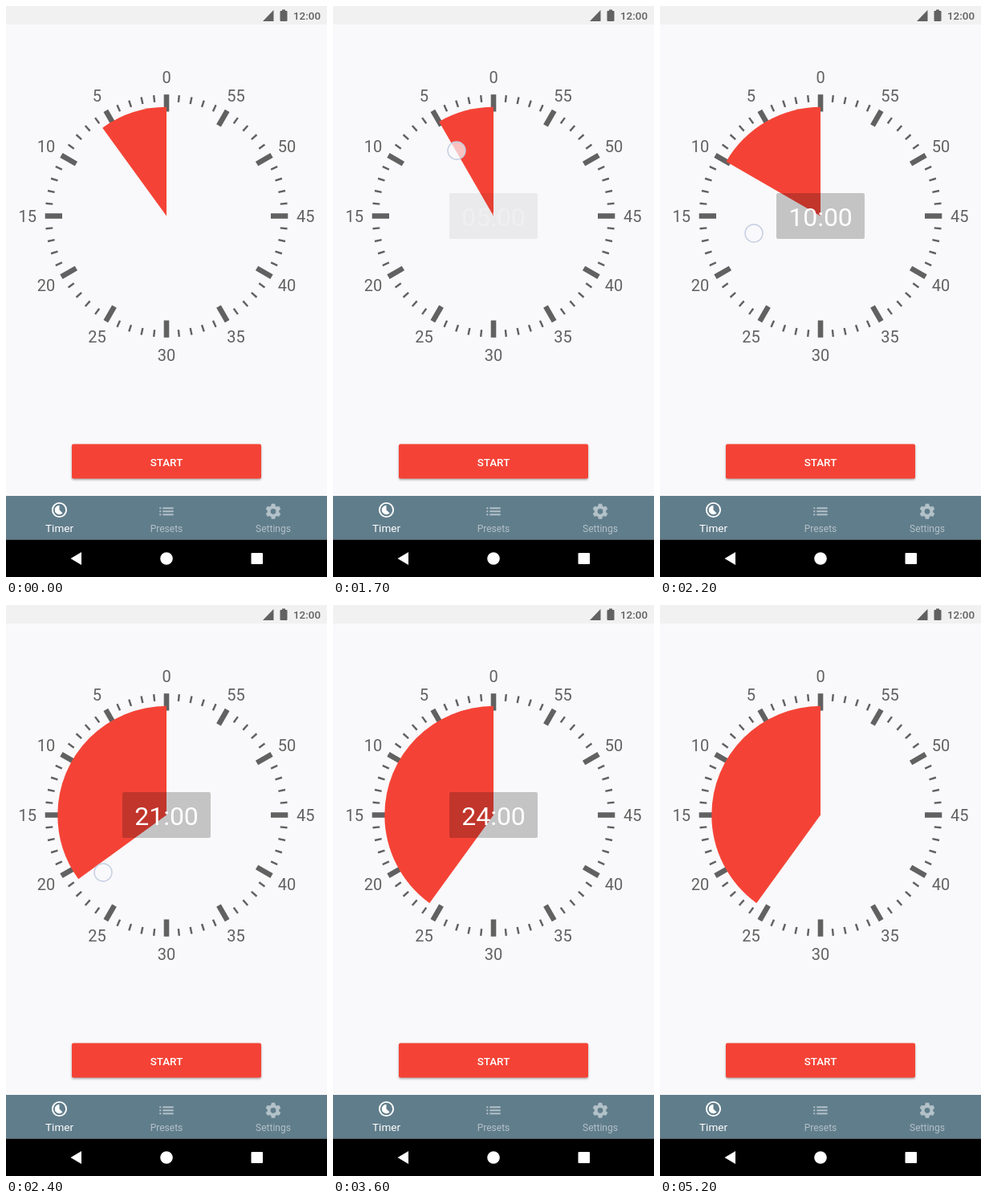
Write an HTML page with a canvas that moves like this. It is 400 px wide and 711 px high and loops after 8 s.

```html
<!DOCTYPE html>
<html lang="en">
<head>
<meta charset="utf-8">
<title>Timer</title>
<style>
html, body { margin: 0; width: 100%; height: 100%; overflow: hidden; background: #f9f8fa; }
canvas { display: block; width: 400px; height: 711px; }
</style>
</head>
<body>
<canvas id="stage"></canvas>
<script>
const W = 400, H = 711, LOOP = 8000, STEP = 100, TAU = Math.PI * 2;
const CX = 200, CY = 261.5;
const RED = '#f44336', GREY = '#616161', DIM = '#b3c1c8';
const canvas = document.getElementById('stage');
const ctx = canvas.getContext('2d');
const dpr = window.devicePixelRatio || 1;
canvas.width = W * dpr;
canvas.height = H * dpr;

// Touch positions, one per step from DRAG_START
const DRAG_START = 1800;
const drag = [
  [154, 180], [151, 186], [142, 204], [127, 242], [117, 283], [116, 313],
  [121, 333], [128, 341], [134, 345.5], [138, 347.5], [140.5, 348.7], [141.5, 349]
];
// [from ms, minutes]
const dial = [
  [0, 6], [1700, 5], [2000, 6], [2100, 7], [2200, 10], [2300, 17],
  [2400, 21], [2500, 22], [2600, 23], [2800, 24]
];

const clamp = (v, lo = 0, hi = 1) => Math.min(hi, Math.max(lo, v));
const ramp = (t, from, to) => clamp((t - from) / (to - from));

function rect(x, y, w, h, color, radius = 0) {
  ctx.fillStyle = color;
  ctx.beginPath();
  ctx.roundRect(x, y, w, h, radius);
  ctx.fill();
}

function disc(x, y, r, color) {
  ctx.fillStyle = color;
  ctx.beginPath();
  ctx.arc(x, y, r, 0, TAU);
  ctx.fill();
}

function polygon(color, ...points) {
  ctx.fillStyle = color;
  ctx.beginPath();
  points.forEach(([x, y]) => ctx.lineTo(x, y));
  ctx.fill();
}

function text(str, x, baseline, size, color, weight = 400) {
  ctx.font = `${weight} ${size}px Roboto, sans-serif`;
  ctx.textAlign = 'center';
  ctx.fillStyle = color;
  ctx.fillText(str, x, baseline);
}

function statusBar() {
  rect(0, 0, W, 23, '#f2f1f2');
  polygon(GREY, [320, 19], [333.5, 19], [333.5, 5]);
  rect(341.5, 6, 9, 13, GREY, 1);
  rect(344, 4.5, 4, 2, GREY);
  text('12:00', 375, 17, 13.4, GREY, 500);
}

function clockFace() {
  for (let m = 0; m < 60; m++) {
    const major = m % 5 === 0;
    const a = m / 60 * TAU;
    const sin = -Math.sin(a), cos = -Math.cos(a);
    const inner = major ? 130 : 142.5;
    ctx.strokeStyle = GREY;
    ctx.lineWidth = major ? 6.6 : 2.4;
    ctx.beginPath();
    ctx.moveTo(CX + sin * inner, CY + cos * inner);
    ctx.lineTo(CX + sin * 151.3, CY + cos * 151.3);
    ctx.stroke();
    if (major) text(m, CX + sin * 173.2, CY + cos * 173.2 + 7.3, 20, GREY);
  }
}

function wedge(minutes) {
  ctx.fillStyle = RED;
  ctx.beginPath();
  ctx.moveTo(CX, CY);
  ctx.arc(CX, CY, 135.7, -TAU / 4, -TAU / 4 - minutes / 60 * TAU, true);
  ctx.fill();
}

function readout(minutes, alpha) {
  if (!alpha) return;
  ctx.globalAlpha = alpha;
  rect(145, 233, 110, 57, 'rgba(0,0,0,.21)', 2);
  text(String(minutes).padStart(2, '0') + ':00', 200, 274, 32, '#fff');
  ctx.globalAlpha = 1;
}

function touch(t) {
  const fadeOut = ramp(t, 3200, 3600);
  const alpha = ramp(t, 1200, 1500) * (1 - fadeOut);
  if (!alpha) return;
  const [x, y] = drag[clamp((t - DRAG_START) / STEP, 0, drag.length - 1)];
  ctx.globalAlpha = alpha;
  disc(x, y, 11 + fadeOut * 2, 'rgba(250,249,252,.7)');
  ctx.strokeStyle = '#c5cee0';
  ctx.lineWidth = 1.4;
  ctx.stroke();
  ctx.globalAlpha = 1;
}

function startButton() {
  ctx.save();
  ctx.shadowColor = 'rgba(0,0,0,.32)';
  ctx.shadowBlur = 3 * dpr;
  ctx.shadowOffsetY = 1.5 * dpr;
  rect(82, 545.5, 236, 43, RED, 2);
  ctx.restore();
  text('START', 200, 572.5, 13.4, '#fff', 500);
}

function timerIcon(x, y) {
  ctx.strokeStyle = '#fff';
  ctx.lineWidth = 1.9;
  ctx.beginPath();
  ctx.arc(x, y, 8.6, 0, TAU);
  ctx.stroke();
  ctx.fillStyle = '#fff';
  ctx.beginPath();
  ctx.moveTo(x, y);
  ctx.arc(x, y, 5.8, -TAU / 4, TAU / 8, true);
  ctx.fill();
}

function listIcon(x, y) {
  for (const dy of [-4, 0, 4]) {
    rect(x - 8.7, y + dy - 1, 2, 2, DIM);
    rect(x - 4.7, y + dy - 1, 13.4, 2, DIM);
  }
}

function gearIcon(x, y) {
  ctx.save();
  ctx.translate(x, y);
  ctx.fillStyle = DIM;
  ctx.beginPath();
  ctx.arc(0, 0, 7.2, 0, TAU);
  ctx.moveTo(3.4, 0);
  ctx.arc(0, 0, 3.4, 0, TAU, true);
  ctx.fill();
  for (let i = 0; i < 6; i++) {
    polygon(DIM, [-3, -6], [-2.1, -9.5], [2.1, -9.5], [3, -6]);
    ctx.rotate(TAU / 6);
  }
  ctx.restore();
}

function bottomBars() {
  rect(0, 610, W, 54.5, '#607d8b');
  timerIcon(66.5, 627.5);
  listIcon(200, 629.3);
  gearIcon(333, 629.3);
  text('Timer', 66.5, 654.5, 13.5, '#fff');
  text('Presets', 200, 654.5, 12, DIM);
  text('Settings', 333, 654.5, 12, DIM);

  rect(0, 664.5, W, H - 664.5, '#000');
  polygon('#fff', [80.5, 688], [94, 680], [94, 696]);
  disc(200, 688, 7.8, '#fff');
  rect(305.5, 681, 14.5, 14, '#fff', 1);
}

function draw(t) {
  const minutes = dial.findLast(([from]) => t >= from)[1];
  ctx.setTransform(dpr, 0, 0, dpr, 0, 0);
  rect(0, 0, W, H, '#f9f8fa');
  statusBar();
  clockFace();
  wedge(minutes);
  readout(minutes, ramp(t, 1600, 1950) * (1 - ramp(t, 4900, 5200)));
  touch(t);
  startButton();
  bottomBars();
}

const started = performance.now();
function frame() {
  const t = (performance.now() - started) % LOOP;
  draw(Math.floor(t / STEP) * STEP);
  requestAnimationFrame(frame);
}
frame();
</script>
</body>
</html>
```
